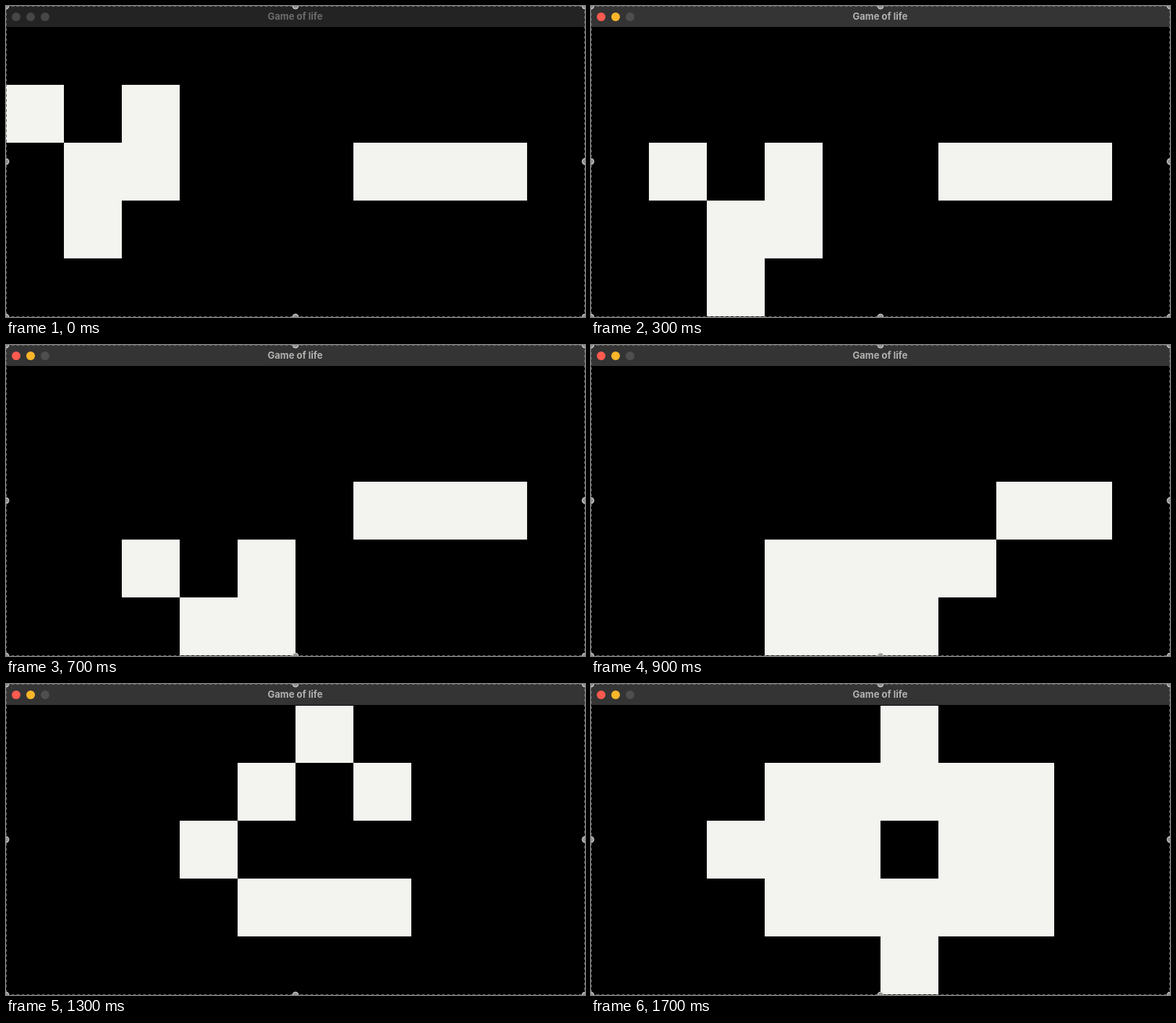
Recreate the animation shown at these times as an HTML page with a canvas. Size 800x430 px, loop 1800 ms.

```html
<!DOCTYPE html>
<html lang="en">
<head>
<meta charset="utf-8">
<title>Game of life</title>
<style>
  html, body { margin: 0; width: 100%; height: 100%; overflow: hidden; background: #000; }
  canvas { display: block; }
</style>
</head>
<body>
<canvas id="stage" width="800" height="430"></canvas>
<script>
const ctx = document.getElementById('stage').getContext('2d');
const W = 800, H = 430, BAR = 29, CELL = 80, COLS = 10, ROWS = 5;
const STEP_MS = 100, STEPS = 18;

const seed = [
  '..........',
  '#.#.......',
  '.##...###.',
  '.#........',
  '..........'
].map(row => [...row].map(c => c === '#'));

const alive = (grid, x, y) => Boolean(grid[y] && grid[y][x]);

function evolve(grid) {
  return grid.map((row, y) => row.map((cell, x) => {
    let n = 0;
    for (let dy = -1; dy <= 1; dy++)
      for (let dx = -1; dx <= 1; dx++)
        if ((dx || dy) && alive(grid, x + dx, y + dy)) n++;
    return n === 3 || (cell && n === 2);
  }));
}

const generations = [seed];
while (generations.length <= STEPS) generations.push(evolve(generations.at(-1)));

function disc(x, y, r, fill) {
  ctx.beginPath();
  ctx.arc(x, y, r, 0, Math.PI * 2);
  ctx.fillStyle = fill;
  ctx.fill();
}

function drawTitleBar(focused) {
  ctx.fillStyle = focused ? '#343434' : '#232323';
  ctx.fillRect(0, 0, W, BAR);
  ctx.fillStyle = '#000';
  ctx.fillRect(0, BAR, W, 1);
  const lights = focused ? ['#fd5a50', '#f8b62a', '#4e4e4e'] : Array(3).fill('#464646');
  lights.forEach((color, i) => disc(14 + i * 20, 15, 6, color));
  ctx.fillStyle = focused ? '#b2b2b0' : '#6c6c6a';
  ctx.font = '700 13px Inter, sans-serif';
  ctx.textAlign = 'center';
  ctx.fillText('Game of life', 399.5, 19);
}

function drawCells(grid) {
  ctx.fillStyle = '#f3f3ef';
  for (let y = 0; y < ROWS; y++)
    for (let x = 0; x < COLS; x++)
      if (grid[y][x]) ctx.fillRect(x * CELL, BAR + y * CELL, CELL, CELL);
}

function drawSelection() {
  ctx.strokeStyle = '#6e6e6a';
  ctx.lineWidth = 1;
  ctx.setLineDash([4, 3]);
  ctx.strokeRect(0.5, 0.5, W - 1, H - 1);
  ctx.setLineDash([]);
  for (const x of [0, W / 2, W])
    for (const y of [0, H / 2, H]) {
      if (x === W / 2 && y === H / 2) continue;
      disc(x, y, 4.5, '#cfcfcc');
      disc(x, y, 3.3, '#92928e');
    }
}

function draw(step) {
  ctx.fillStyle = '#000';
  ctx.fillRect(0, 0, W, H);
  // The opening step advances two generations.
  drawCells(generations[step ? step + 1 : 0]);
  drawTitleBar(step > 0);
  drawSelection();
}

const start = performance.now();
function tick() {
  draw(Math.floor((performance.now() - start) / STEP_MS) % STEPS);
  requestAnimationFrame(tick);
}
tick();
</script>
</body>
</html>
```
